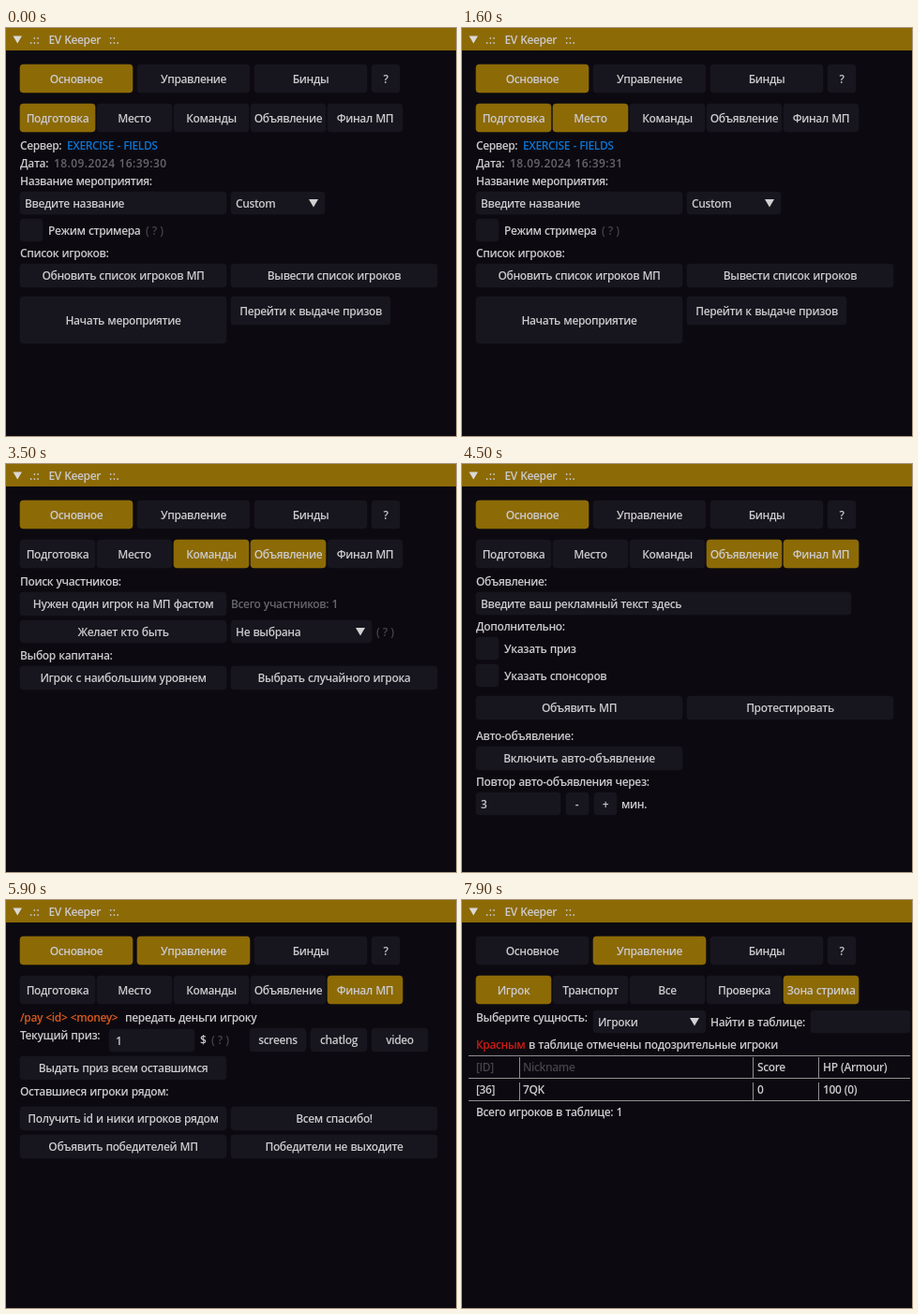
An HTML page for the animation above (8000 ms loop, 480 px wide and 436 px high).

```html
<!DOCTYPE html>
<html lang="ru">
<head>
<meta charset="utf-8">
<style>
  html, body { margin: 0; width: 100%; height: 100%; overflow: hidden; background: #0c0a10; }
  svg { display: block; width: 480px; height: 436px; }
  text { font: 600 12px "Open Sans", "Noto Sans", sans-serif; letter-spacing: -.38px; word-spacing: .6px; fill: #cbcacd; }
  text.num { letter-spacing: .4px; }
  text.mid { text-anchor: middle; }
</style>
</head>
<body>
<svg id="stage" viewBox="0 0 480 436"></svg>
<script>
const LOOP = 8000, STEP = 100;
const GOLD = '#8c6a06', PANEL = '#17151d', DIM = '#67666c', FAINT = '#45444b',
      BLUE = '#0b74d4', ORANGE = '#dc5a1c', RED = '#d01a16';
const SOFT = .3; // boxes bleed a little past their edge
const stage = document.getElementById('stage');

function add(parent, tag, attrs, text) {
  const el = document.createElementNS('http://www.w3.org/2000/svg', tag);
  for (const k in attrs) el.setAttribute(k, attrs[k]);
  if (text) el.textContent = text;
  return parent.appendChild(el);
}

// Helpers for one group of widgets; y of text is its middle line.
function kit(g) {
  const box = (x, y, w, h, fill = PANEL) => add(g, 'rect', {
    x: x - SOFT, y: y - SOFT, width: w + 2 * SOFT, height: h + 2 * SOFT, rx: 4, fill
  });
  const label = (x, y, s, fill) => {
    const el = add(g, 'text', { x, y: y + 4 }, s);
    if (/^[\d.:,xyz -]+$/.test(s)) el.classList.add('num');
    if (fill) el.style.fill = fill;
    return el;
  };
  const button = (x, y, w, h, s) => {
    box(x, y, w, h);
    label(x + w / 2, y + h / 2 + .5, s).classList.add('mid');
  };
  const input = (x, y, w, s, pad = 5) => {
    box(x, y, w, 24);
    if (s) label(x + pad, y + 12.5, s);
  };
  const combo = (x, y, w, s) => {
    input(x, y, w, s);
    add(g, 'path', { d: `M${x + w - 17} ${y + 8}h10l-5 8.500z`, fill: '#d2d1d4' });
  };
  const check = (y, s) => { box(15, y, 24, 24); label(45, y + 12.5, s); };
  const line = (x1, y1, x2, y2) => add(g, 'path', { d: `M${x1} ${y1}L${x2} ${y2}`, stroke: '#8f8e93' });
  return { box, label, button, input, combo, check, line };
}

// Linear track of [time, value] pairs.
function at(track, t) {
  let [t0, v0] = track[0];
  for (const [t1, v1] of track) {
    if (t < t1) return t <= t0 ? v0 : v0 + (v1 - v0) * (t - t0) / (t1 - t0);
    t0 = t1; v0 = v1;
  }
  return v0;
}

let clock;
const scenes = [
  { from: 0, draw({ label, button, input, combo, check }) {
    label(15, 126, 'Сервер:');
    label(65, 126, 'EXERCISE - FIELDS', BLUE);
    label(15, 145, 'Дата:');
    clock = label(51, 145, '18.09.2024 16:39:30', DIM);
    label(15, 164, 'Название мероприятия:');
    input(15, 175, 220, 'Введите название');
    combo(240, 175, 100, 'Custom');
    check(204, 'Режим стримера');
    label(149, 217, '( ? )', FAINT);
    label(15, 241, 'Список игроков:');
    button(15, 252, 220, 25, 'Обновить список игроков МП');
    button(240, 252, 220, 25, 'Вывести список игроков');
    button(15, 287, 220, 50, 'Начать мероприятие');
    button(240, 287, 170, 30, 'Перейти к выдаче призов');
  } },
  { from: 1700, draw({ label, button }) {
    label(15, 126, 'Вы находитесь в районе:');
    label(165, 126, 'Verdant Bluffs', DIM);
    label(15, 145, 'Ваша позиция на карте');
    label(153, 145, 'x: 1266.1, y: -2011.5, z: 59.2', DIM);
    label(15, 169, 'Место проведения:');
    button(15, 180, 135, 25, 'Выбрать интерьер');
    button(155, 180, 100, 25, 'Настр. спавн');
    button(15, 210, 240, 25, 'Сообщить местоположение в чат');
  } },
  { from: 2700, draw({ label, button, combo }) {
    label(15, 126, 'Поиск участников:');
    button(15, 137, 220, 25, 'Нужен один игрок на МП фастом');
    label(240, 150, 'Всего участников: 1', DIM);
    button(15, 167, 220, 24, 'Желает кто быть');
    combo(240, 167, 150, 'Не выбрана');
    label(395, 180, '( ? )', FAINT);
    label(15, 205, 'Выбор капитана:');
    button(15, 216, 220, 25, 'Игрок с наибольшим уровнем');
    button(240, 216, 220, 25, 'Выбрать случайного игрока');
  } },
  { from: 3800, draw({ label, button, input, check }) {
    label(15, 126, 'Объявление:');
    input(15, 137, 400, 'Введите ваш рекламный текст здесь');
    label(15, 174, 'Дополнительно:');
    check(185, 'Указать приз');
    check(214, 'Указать спонсоров');
    button(15, 248, 220, 25, 'Объявить МП');
    button(240, 248, 220, 25, 'Протестировать');
    label(15, 291, 'Авто-объявление:');
    button(15, 302, 220, 25, 'Включить авто-объявление');
    label(15, 340, 'Повтор авто-объявления через:');
    input(15, 351, 90, '3');
    button(111, 351, 24, 24, '-');
    button(141, 351, 24, 24, '+');
    label(170, 364, 'мин.');
  } },
  { from: 5000, draw({ label, button, input }) {
    label(15, 126, '/pay <id> <money>', ORANGE);
    label(127, 126, 'передать деньги игроку');
    label(15, 145, 'Текущий приз:');
    input(110, 138, 91, '1', 7);
    label(207, 150, '$');
    label(219, 150, '( ? )', FAINT);
    ['screens', 'chatlog', 'video'].forEach((s, i) => button(260 + 65 * i, 137, 60, 25, s));
    button(15, 167, 220, 25, 'Выдать приз всем оставшимся');
    label(15, 205, 'Оставшиеся игроки рядом:');
    button(15, 221, 220, 25, 'Получить id и ники игроков рядом');
    button(240, 221, 220, 25, 'Всем спасибо!');
    button(15, 251, 220, 25, 'Объявить победителей МП');
    button(240, 251, 220, 25, 'Победители не выходите');
  } },
  { from: 7000, draw({ label, input, combo, line }) {
    label(15, 126, 'Выберите сущность:');
    combo(140, 118, 120, 'Игроки');
    label(265, 131, 'Найти в таблице:');
    input(372, 118, 106);
    label(15, 155, 'Красным', RED);
    label(71, 155, 'в таблице отмечены подозрительные игроки');
    for (const y of [166.5, 190.5, 214.5]) line(7, y, 478, y);
    for (const x of [61.5, 310.5, 380.5]) { line(x, 168, x, 190); line(x, 195, x, 214); }
    const cols = [15, 65, 315, 385];
    ['[ID]', 'Nickname', 'Score', 'HP (Armour)'].forEach((s, i) => label(cols[i], 179, s, i < 2 ? FAINT : ''));
    ['[36]', '7QK', '0', '100 (0)'].forEach((s, i) => label(cols[i], 203, s));
    label(15, 227, 'Всего игроков в таблице: 1');
  } }
];

// Title bar
add(stage, 'rect', { width: 480, height: 436, fill: '#0c0a10' });
add(stage, 'rect', { width: 480, height: 24, fill: GOLD });
add(stage, 'path', { d: 'M7.500 8.500h9.500l-4.750 8z', fill: '#dad9d8' });
const base = kit(stage);
base.label(25, 13, '.::');
base.label(45.5, 13, 'EV Keeper');
base.label(110, 13, '::.');

// Tabs: a plain box, a gold one that fades over it, then the caption.
const glows = [];
function tab(x, y, w, captions, track) {
  base.box(x, y, w, 30);
  if (track) glows.push([base.box(x, y, w, 30, GOLD), track]);
  return captions.map(s => {
    const el = base.label(x + w / 2, y + 15.5, s);
    el.classList.add('mid');
    return el;
  });
}
tab(15, 39, 120, ['Основное'], [[6900, 1], [7200, 0]]);
tab(140, 39, 120, ['Управление'], [[5300, 0], [5700, 1]]);
tab(265, 39, 120, ['Бинды']);
tab(390, 39, 30, ['?']);
const subTabs = [
  ['Подготовка', 'Игрок', [[1600, 1], [1800, 0], [6900, 0], [7200, 1]]],
  ['Место', 'Транспорт', [[900, 0], [1300, 1], [2600, 1], [2800, 0]]],
  ['Команды', 'Все', [[2000, 0], [2300, 1], [3700, 1], [4000, 0]]],
  ['Объявление', 'Проверка', [[3100, 0], [3500, 1], [4900, 1], [5200, 0]]],
  ['Финал МП', 'Зона стрима', [[4300, 0], [4500, 1]]]
].map(([a, b, track], i) => tab(15 + 82 * i, 81, 80, [a, b], track));

for (const s of scenes) {
  s.g = add(stage, 'g');
  s.draw(kit(s.g));
}

const show = (el, on) => { el.style.display = on ? '' : 'none'; };

function render(now) {
  const t = Math.floor(now % LOOP / STEP) * STEP;
  const current = scenes.filter(s => s.from <= t).pop();
  for (const s of scenes) show(s.g, s === current);
  const managing = t >= 7000;
  for (const [a, b] of subTabs) { show(a, !managing); show(b, managing); }
  for (const [el, track] of glows) el.setAttribute('opacity', at(track, t));
  clock.textContent = '18.09.2024 16:39:' + (t < 800 ? 30 : 31);
}

const start = performance.now();
function tick() {
  render(performance.now() - start);
  requestAnimationFrame(tick);
}
tick();
</script>
</body>
</html>
```
